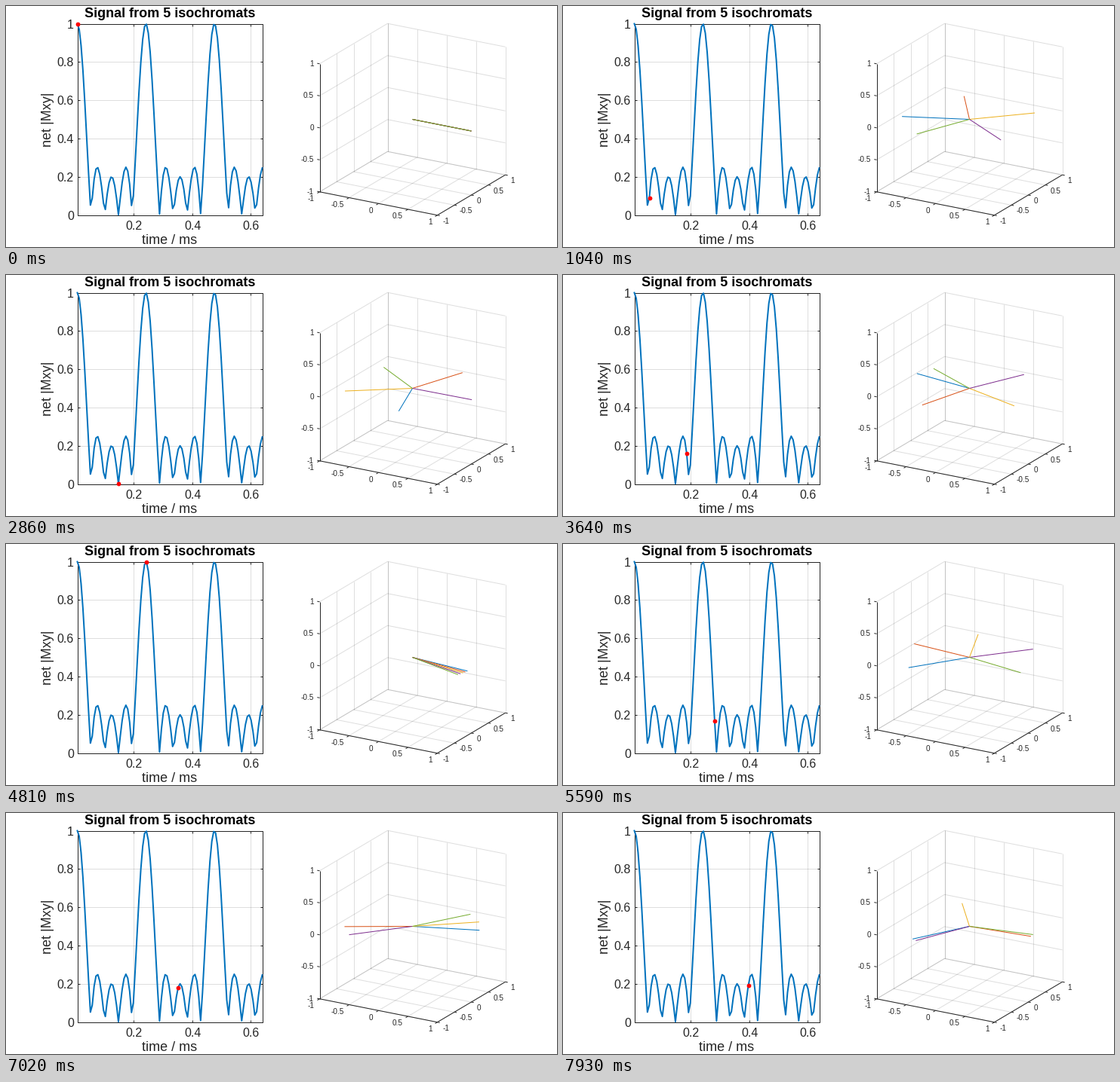
A matplotlib script that plays this animation: 730x320 px, repeating every 8 s.

```python
import numpy as np
import matplotlib.pyplot as plt
from matplotlib.animation import FuncAnimation

W, H, DPI = 730, 320, 100
PX = 72 / DPI                       # points per pixel
LOOP, TICK, STEP = 8000, 20, 130    # ms
INK = "#262626"
COLORS = ["#0072BD", "#D95319", "#EDB120", "#7E2F8E", "#77AC30"]

# Precession of five isochromats at 0.2 ... 0.6 mT
DT = 0.0064                                       # ms
FREQ = 42.58 * np.array([0.2, 0.3, 0.4, 0.5, 0.6])  # kHz
steps = np.arange(100)
phase = -2 * np.pi * DT * np.outer(steps, FREQ)
signal = np.abs(np.exp(1j * phase).mean(axis=1))
time = (steps + 1) * DT

plt.rcParams["font.family"] = "Liberation Sans"
fig = plt.figure(figsize=(W / DPI, H / DPI), dpi=DPI, facecolor="white")
ax = fig.add_axes([0, 0, 1, 1])
ax.set(xlim=(0, W), ylim=(H, 0))
ax.axis("off")


def line(p, q, color=INK, width=1, **kw):
    return ax.plot([p[0], q[0]], [p[1], q[1]], color=color, lw=width * PX,
                   solid_capstyle="butt", **kw)[0]


def label(x, y, s, size, ha="center", va="baseline", color=INK, **kw):
    ax.text(x, y, s, fontsize=size * PX, ha=ha, va=va, color=color, **kw)


# Signal plot
LEFT, RIGHT, TOP, BOTTOM = 94.5, 339.5, 23.5, 277.5


def sx(t):
    return LEFT + (t - time[0]) / (time[-1] - time[0]) * (RIGHT - LEFT)


def sy(v):
    return BOTTOM - v * (BOTTOM - TOP)


def signal_axes():
    for t in (0.2, 0.4, 0.6):
        x = sx(t)
        line((x, TOP), (x, BOTTOM), alpha=0.15)
        line((x, BOTTOM), (x, BOTTOM - 3))
        line((x, TOP), (x, TOP + 3))
        label(x + 0.5, 297, f"{t:g}", 16)
    for v in np.arange(6) / 5:
        y = sy(v)
        line((LEFT, y), (RIGHT, y), alpha=0.15)
        line((LEFT, y), (LEFT + 3, y))
        line((RIGHT, y), (RIGHT - 3, y))
        label(90, y + 6, f"{v:g}", 16, ha="right")
    ax.plot([LEFT, RIGHT, RIGHT, LEFT, LEFT], [TOP, TOP, BOTTOM, BOTTOM, TOP],
            color=INK, lw=PX, solid_joinstyle="miter")
    label(217, 15, "Signal from 5 isochromats", 18, color="black", weight="bold")
    label(217, 315.5, "time / ms", 18)
    label(60, 151, "net |Mxy|", 18, rotation=90, va="center_baseline"
          if False else "baseline", rotation_mode="anchor")
    ax.plot(sx(time), sy(signal), color=COLORS[0], lw=2 * PX,
            solid_joinstyle="round")


# Orthographic 3D box
ORIGIN = np.array([538.5, 150.5])
BASIS = np.array([[78, 15.5], [45, -26.75], [0, -85]])


def project(x, y, z=0):
    return ORIGIN + np.array([x, y, z]) @ BASIS


def box_axes():
    ticks = np.linspace(-1, 1, 5)
    for v in ticks:
        for p, q in [((v, -1, -1), (v, 1, -1)), ((-1, v, -1), (1, v, -1)),
                     ((-1, v, -1), (-1, v, 1)), ((-1, -1, v), (-1, 1, v)),
                     ((v, 1, -1), (v, 1, 1)), ((-1, 1, v), (1, 1, v))]:
            line(project(*p), project(*q), alpha=0.15)
    line(project(-1, -1, -1), project(1, -1, -1))
    line(project(1, -1, -1), project(1, 1, -1))
    line(project(-1, -1, -1), project(-1, -1, 1))
    for v in ticks:
        px, py, pz = project(v, -1, -1), project(1, v, -1), project(-1, -1, v)
        line(px, px + (-3, 1.8))
        line(py, py + (3.2, 0.6))
        line(pz, pz + (-3.2, -0.6))
        s = f"{v:g}"
        label(px[0] - 7, px[1] + 12.5, s, 10, ha="right")
        label(py[0] + 7, py[1] + 11, s, 10, ha="left")
        label(pz[0] - 7.5, pz[1] + 3, s, 10, ha="right")


signal_axes()
box_axes()
vectors = [line(ORIGIN, ORIGIN, color=c) for c in COLORS]
dot, = ax.plot([], [], "o", color="red", ms=5.8 * PX, mew=0, zorder=5)


def update(k):
    i = int((k + 0.5) * TICK // STEP)
    dot.set_data([sx(time[i]) + 0.3], [sy(signal[i]) + 0.3])
    for vec, a in zip(vectors, phase[i]):
        tip = project(np.cos(a), np.sin(a))
        vec.set_data([ORIGIN[0], tip[0]], [ORIGIN[1], tip[1]])
    return [dot, *vectors]


anim = FuncAnimation(fig, update, frames=LOOP // TICK, interval=TICK,
                     repeat=True, repeat_delay=0)
plt.show()
```
